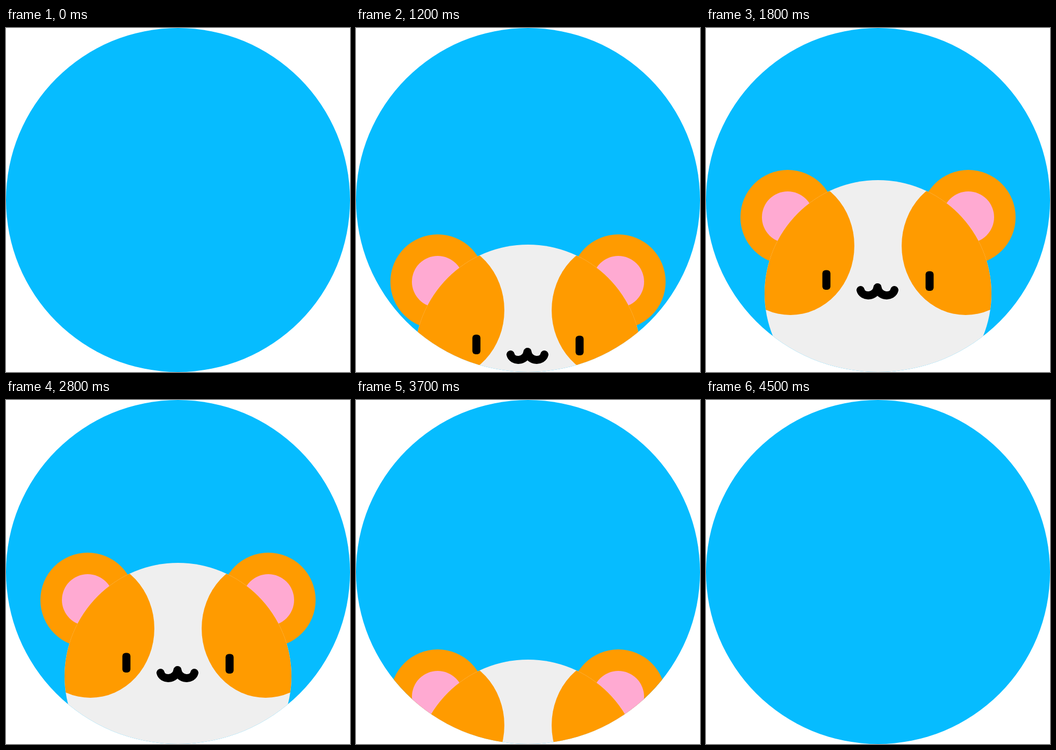
These frames come from a looping animation (640x640 px, 4.6 s). An HTML page with a canvas:

```html
<!DOCTYPE html>
<html lang="en">
<head>
<meta charset="utf-8">
<title>Peeking hamster</title>
<style>
  html, body { margin: 0; width: 100%; height: 100%; overflow: hidden; background: #fff; }
  canvas { display: block; width: 100vmin; height: 100vmin; }
</style>
</head>
<body>
<canvas id="stage" width="640" height="640"></canvas>
<script>
const ctx = document.getElementById('stage').getContext('2d');
const SIZE = 640, MID = SIZE / 2;
const LOOP = 4600, STEP = 100, RISE = 20;
const BLUE = '#06bcff', ORANGE = '#ff9b00', PINK = '#ffaad2', WHITE = '#efefef', BLACK = '#000';

function ellipse(x, y, rx, ry = rx) {
  ctx.beginPath();
  ctx.ellipse(x, y, rx, ry, 0, 0, Math.PI * 2);
}

function disc(color, ...shape) {
  ellipse(...shape);
  ctx.fillStyle = color;
  ctx.fill();
}

function eye(x, y) {
  ctx.beginPath();
  ctx.roundRect(x - 7.5, y, 15, 36.5, 6);
  ctx.fillStyle = BLACK;
  ctx.fill();
}

function mouth() {
  ctx.beginPath();
  ctx.moveTo(287.5, 487.5);
  ctx.bezierCurveTo(291, 501.5, 316, 501.5, 319, 482.5);
  ctx.bezierCurveTo(322, 501.5, 347, 501.5, 350.5, 487.5);
  ctx.lineWidth = 15;
  ctx.lineCap = ctx.lineJoin = 'round';
  ctx.strokeStyle = BLACK;
  ctx.stroke();
}

function hamster() {
  for (const side of [-1, 1]) {
    disc(ORANGE, MID + side * 168, 352, 88);
    disc(PINK, MID + side * 168, 352, 48);
  }
  disc(WHITE, MID, 494, 211);

  // Patches stay within the body outline
  ctx.save();
  ellipse(MID, 494, 211);
  ctx.clip();
  for (const side of [-1, 1]) disc(ORANGE, MID + side * 163, 405, 119, 129);
  ctx.restore();

  eye(224, 450.5);
  eye(416, 452.5);
  mouth();
}

// Climbs 18 steps, rests, then sinks 18 steps
function drop(time) {
  const step = Math.floor((time % LOOP) / STEP);
  return RISE * Math.max(18 - step, step - 27, 0);
}

function draw(time) {
  ctx.clearRect(0, 0, SIZE, SIZE);
  disc(BLUE, MID, MID, MID);
  ctx.save();
  ellipse(MID, MID, MID);
  ctx.clip();
  ctx.translate(0, drop(time));
  hamster();
  ctx.restore();
}

const start = performance.now();
function tick() {
  draw(performance.now() - start);
  requestAnimationFrame(tick);
}
tick();
</script>
</body>
</html>
```
